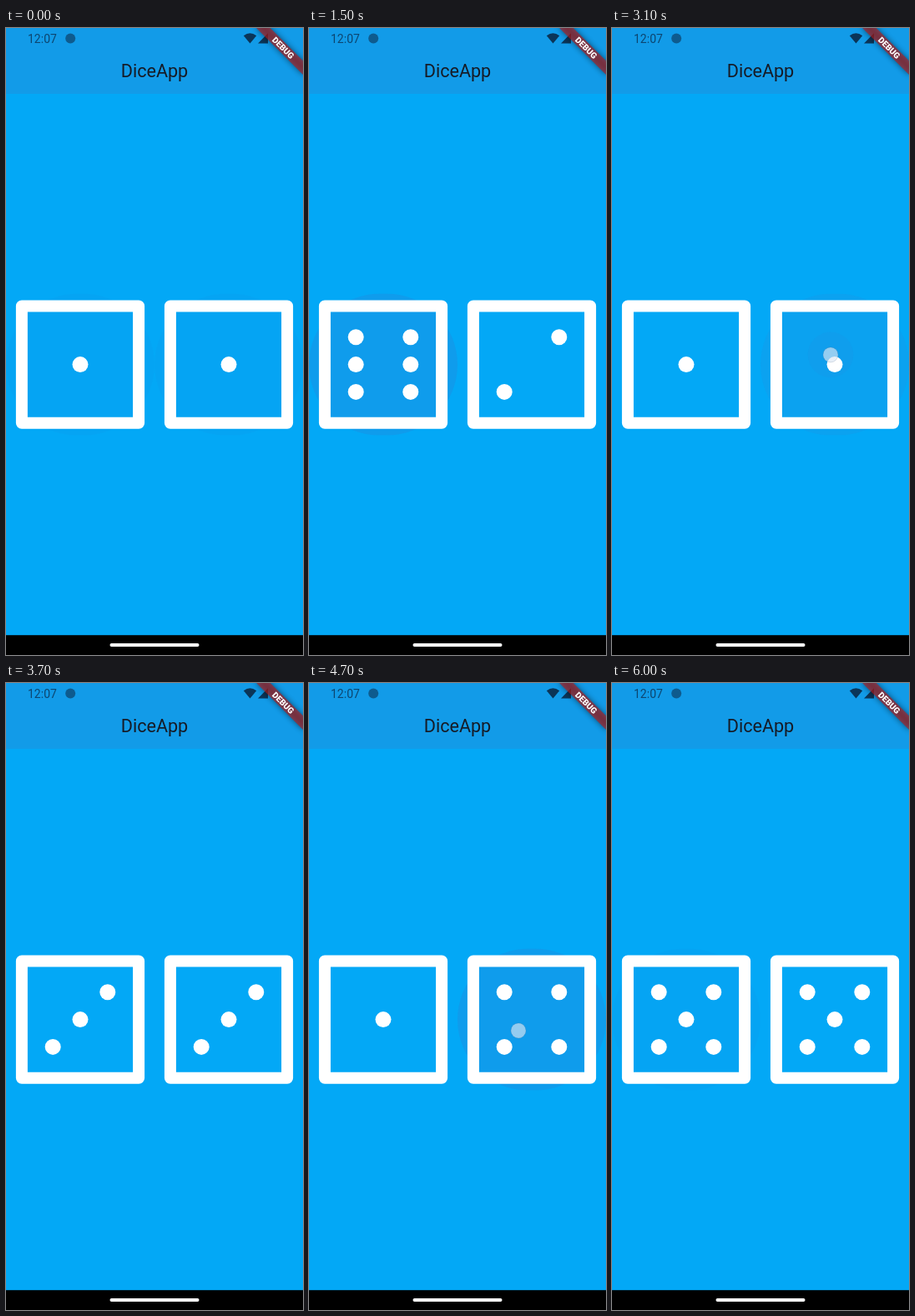
An HTML page that plays this animation: 356 px wide and 752 px high, repeating every 6100 ms.

```html
<!DOCTYPE html>
<html lang="en">
<head>
<meta charset="utf-8">
<title>DiceApp</title>
<style>
  html, body { margin: 0; width: 100%; height: 100%; overflow: hidden; background: #03a8f6; }
  svg { display: block; width: 356px; height: 752px; font-family: Roboto, sans-serif; }
</style>
</head>
<body>
<svg viewBox="0 0 356 752">
  <defs>
    <filter id="blur" x="-30%" y="-150%" width="160%" height="400%"><feGaussianBlur stdDeviation="3.6"/></filter>
    <clipPath id="button"><rect x="-89" y="-85" width="178" height="170" rx="85"/></clipPath>
  </defs>
  <rect width="356" height="752" fill="#03a8f6"/>
  <rect width="356" height="79" fill="#129be8"/>
  <text x="178" y="58.5" font-size="21.6" text-anchor="middle" fill="#161b26">DiceApp</text>

  <g fill="#0d4670">
    <text x="26" y="18" font-size="14">12:07</text>
    <circle cx="77.2" cy="12.6" r="6" opacity=".75"/>
    <path d="M284.8 9.2Q292.5 3.2 300.2 9.2L292.5 18.6ZM302 18.4L314 6.2V18.4Z" fill="#0b3558"/>
  </g>

  <g transform="translate(356 0) scale(.989) rotate(45)">
    <rect x="-40" y="28" width="80" height="12" filter="url(#blur)" opacity=".5"/>
    <rect x="-40" y="28" width="80" height="12" fill="#b71c1c" opacity=".63"/>
    <text y="37.6" font-size="10.2" font-weight="900" text-anchor="middle" fill="#fff">DEBUG</text>
  </g>

  <g id="dice"></g>

  <rect y="728.2" width="356" height="24" fill="#000"/>
  <rect x="124.5" y="738.1" width="107" height="4" rx="2" fill="#fff"/>
</svg>
<script>
const LOOP = 6100, STEP = 100, PRESS = 200, LINGER = 100, FADE = 400;
const LEFT = 0, RIGHT = 1;

// finger up (ms), die pressed, faces rolled
const taps = [
  [-300, LEFT, [1, 1]],
  [-300, RIGHT, [1, 1]],
  [400, LEFT, [4, 3]],
  [1000, RIGHT, [5, 6]],
  [1400, LEFT, [6, 2]],
  [1900, LEFT, [1, 4]],
  [2500, RIGHT, [1, 1]],
  [3200, RIGHT, [3, 3]],
  [4100, LEFT, [6, 6]],
  [4700, RIGHT, [1, 4]],
  [5700, LEFT, [5, 5]]
];

const clamp = v => Math.max(0, Math.min(1, v));
const circle = (x, y, r, style = '') => `<circle cx="${x}" cy="${y}" r="${r}" ${style}/>`;

function pips(n) {
  const spots = [];
  const pair = (x, y) => spots.push([x, y], [-x, -y]);
  if (n % 2) spots.push([0, 0]);
  if (n > 1) pair(1, -1);
  if (n > 3) pair(1, 1);
  if (n > 5) pair(1, 0);
  return spots.map(([x, y]) => circle(32.8 * x, 32.8 * y, 9.5, 'fill="#fff"')).join('');
}

// All coordinates are relative to the centre of the die.
function die(side, t) {
  let ink = '', touch = '', face = 1;
  for (const [up, pressed, faces] of taps) {
    if (t >= up) face = faces[side];
    const age = t - up + PRESS;
    if (pressed !== side || age < 0) continue;

    const swing = Math.sin(Math.PI * (up - 3950) / 1500);
    const x = -10.5 - 5.5 * swing, y = 0.8 + 12.5 * swing;
    const fade = clamp(1 - (t - up - LINGER) / FADE) ** 2;
    const radius = 15 + 170 * clamp(age / 240) ** 3;
    ink += `<g opacity="${fade}"><rect x="-89" y="-85" width="178" height="170" opacity="${0.09 * clamp(age / 120)}"/>` +
      circle(x, y, radius, 'opacity=".045"') + '</g>';
    if (t <= up) touch += circle(x, y, 9, 'fill="#dbe6f2" fill-opacity=".65" stroke="#5a7090" stroke-opacity=".2"');
  }
  return `<g transform="translate(${89 + 178 * side} 403.6)">
    <g clip-path="url(#button)" fill="#6750a4">${ink}</g>
    <rect x="-70.1" y="-70.1" width="140.2" height="140.2" fill="none" stroke="#fff" stroke-width="14" stroke-linejoin="round"/>
    ${pips(face)}${touch}</g>`;
}

const dice = document.getElementById('dice');
const start = performance.now();
let shown = -1;
function tick() {
  const t = Math.floor((performance.now() - start) % LOOP / STEP) * STEP;
  if (t !== shown) {
    shown = t;
    dice.innerHTML = die(LEFT, t) + die(RIGHT, t);
  }
  requestAnimationFrame(tick);
}
tick();
</script>
</body>
</html>
```
